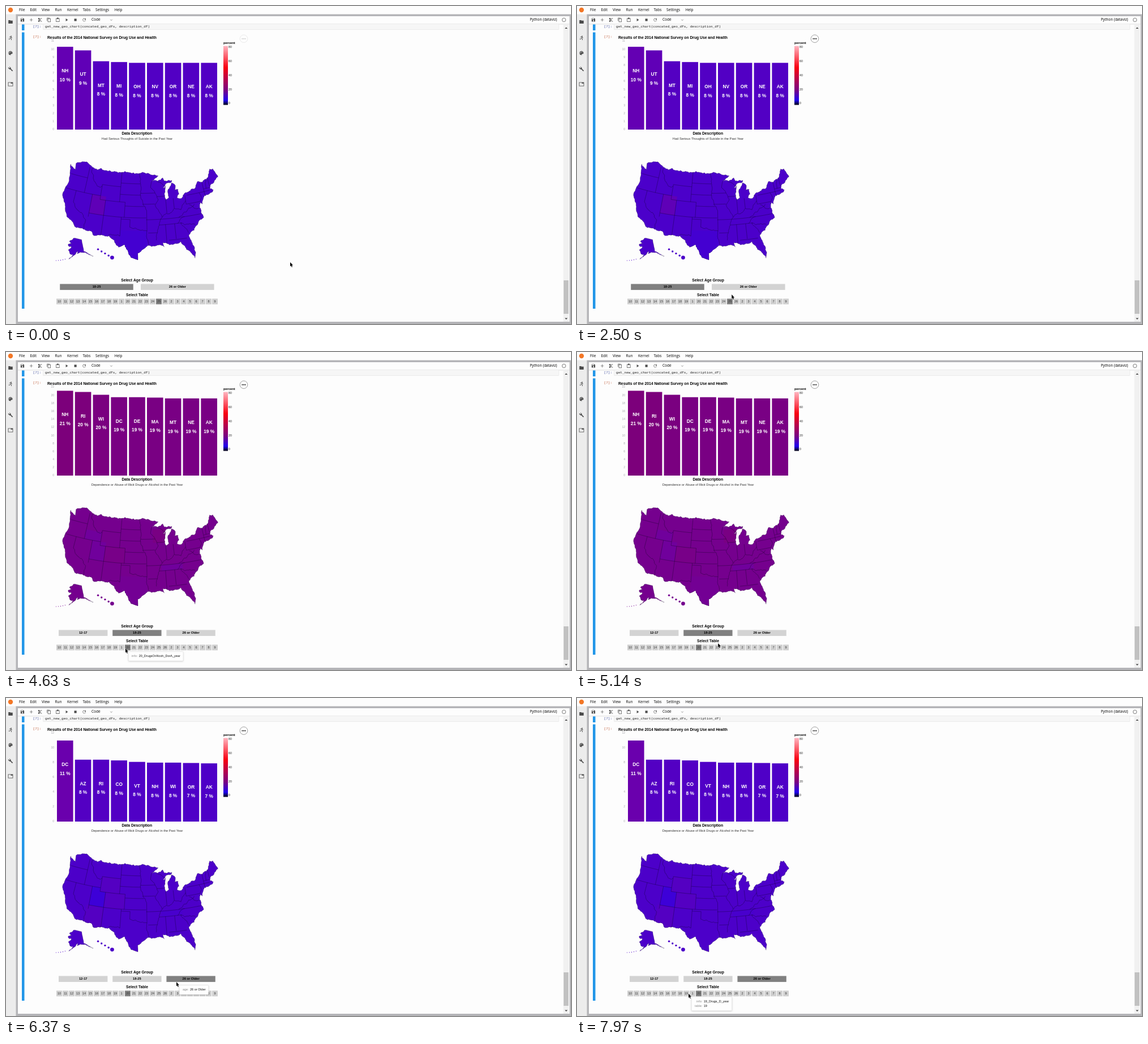
An HTML page with a canvas for the animation above (8 s loop, 998x561 px).

```html
<!DOCTYPE html>
<html lang="en">
<head>
<meta charset="utf-8">
<title>Survey dashboard</title>
<style>
html, body { margin: 0; width: 100%; height: 100%; overflow: hidden; background: #fdfdfd; }
canvas { display: block; }
</style>
</head>
<body>
<canvas id="stage" width="998" height="561"></canvas>
<script>
const ctx = document.getElementById('stage').getContext('2d');
const LOOP = 8000;
const SANS = '"Liberation Sans", Arial, sans-serif';
const UI = '"Open Sans", sans-serif';
const MONO = '"Liberation Mono", monospace';

// ---------- basic drawing ----------
function rect(x, y, w, h, fill) {
  ctx.fillStyle = fill;
  ctx.fillRect(x, y, w, h);
}
function text(str, x, y, { size = 5.72, font = SANS, bold = false, color = '#000', align = 'left' } = {}) {
  ctx.font = `${bold ? 'bold ' : ''}${size}px ${font}`;
  ctx.fillStyle = color;
  ctx.textAlign = align;
  ctx.textBaseline = 'middle';
  ctx.fillText(str, x, y);
}
function circle(x, y, r, fill, stroke) {
  ctx.beginPath();
  ctx.arc(x, y, r, 0, 7);
  if (fill) { ctx.fillStyle = fill; ctx.fill(); }
  if (stroke) { ctx.strokeStyle = stroke; ctx.lineWidth = 0.7; ctx.stroke(); }
}
// Icons are drawn on a 24-unit grid centred on (x, y).
function icon(d, x, y, size = 8.3, stroke = false) {
  ctx.save();
  ctx.translate(x - size / 2, y - size / 2);
  ctx.scale(size / 24, size / 24);
  ctx.fillStyle = ctx.strokeStyle = '#4a4a4a';
  ctx.lineWidth = 2.4;
  if (stroke) ctx.stroke(new Path2D(d));
  else ctx.fill(new Path2D(d), 'evenodd');
  ctx.restore();
}

// ---------- map: conic equal-area projections, longitudes in degrees west ----------
const RAD = Math.PI / 180;
function conic(p1, p2, lon0, [cLon, cLat], scale, x0, y0) {
  const sin = Math.sin, s1 = sin(p1 * RAD);
  const n = (s1 + sin(p2 * RAD)) / 2;
  const c = 1 - s1 * s1 + 2 * n * s1;
  const raw = ([lon, lat]) => {
    const rho = Math.sqrt(c - 2 * n * sin(lat * RAD)) / n, a = n * (lon0 - lon) * RAD;
    return [rho * sin(a), rho * Math.cos(a)];
  };
  const [cx, cy] = raw([cLon, cLat]);
  return point => {
    const [x, y] = raw(point);
    return [x0 + scale * (x - cx), y0 + scale * (y - cy)];
  };
}
const mainland = conic(29.5, 45.5, 96, [96.6, 38.7], 380, 237.2, 362.5);
const alaskan = conic(55, 65, 154, [156, 58.5], 133, 120.5, 438.9);
const hawaiian = conic(8, 18, 157, [160, 19.9], 380, 159.3, 443.1);

let seed = 11;
const jitter = () => (seed = seed * 16807 % 2147483647) / 2147483647 - 0.5;

// Halves a segment until it is short, pushing each midpoint sideways by a share of its length.
function split(a, b, roughness, visit) {
  const dx = b[0] - a[0], dy = b[1] - a[1], length = Math.hypot(dx, dy);
  if (length < 0.4) return visit(b);
  const push = length < 8 ? jitter() * roughness : 0;
  const middle = [(a[0] + b[0]) / 2 - dy * push, (a[1] + b[1]) / 2 + dx * push];
  split(a, middle, roughness, visit);
  split(middle, b, roughness, visit);
}
function trace(path, numbers, roughness = 0, project = mainland) {
  const points = [];
  for (let i = 0; i < numbers.length; i += 2) points.push([numbers[i], numbers[i + 1]]);
  path.moveTo(...project(points[0]));
  for (let i = 1; i < points.length; i++)
    split(points[i - 1], points[i], roughness, p => path.lineTo(...project(p)));
  return path;
}
const parse = str => str.trim().split(/\s+/).map(Number);

const country = trace(new Path2D(), parse(`122.8 49 95.2 49 92 48.3 89.6 48 92.1 46.8 90 46.6 87.9 47.4 87.4 46.5
  84.5 46.5 84.7 46 87 45.7 88 44.6 87 45.2 87.8 43 87.4 41.6 86.3 42 86.4 44 84.8 45.8 83.4 45 83.8 43.7 82.6 43.9
  82.5 42.6 83.4 41.7 81.7 41.5 78.9 42.8 76.2 43.5 74.9 45 71.5 45 69.2 47.4 68 47.2 67 44.8 70.5 43.3 71 42.3
  70 41.8 73.7 40.9 74.1 40.5 75 38.9 75.6 39.4 76 36.9 75.6 35.3 77.9 33.9 81.2 31.6 80.1 26.9 80.5 25.2
  82.6 27.8 84 30.1 85.3 29.7 89.5 30.3 89.2 29.1 93.8 29.7 97.3 27.6 97.2 25.9 99.2 26.4 101.4 29.8 103.1 29
  106.5 31.8 111.1 31.3 114.8 32.5 117.1 32.5 120.6 34.6 122.5 37.7 124.4 40.4 124.1 46.3 124.7 48.4 122.4 47.3`), 0.3);
country.closePath();
const alaska = trace(new Path2D(), parse(`141 69.6 141 60.3 137 59 130 55 136.5 58.2 140 59.7 148 60 152 59.3 150.5 61.2
  154 59 163 54.8 157.8 58.6 162 58.8 166 61.7 161 64 168 65.6 162 66.5 166.5 68.3 156.6 71.3`), 0.25, alaskan);
alaska.closePath();

// Survey lines follow parallels (lat, west, east) or meridians (lon, south, north); the rest follow rivers and ridges.
const borders = new Path2D();
[[46, 123.5, 117], [42, 124.2, 111], [45, 111, 104], [41, 111, 102], [37, 114, 94.6], [46, 104, 96.6], [43, 104, 96.5],
  [40, 102, 95.3], [43.5, 96.5, 91.2], [40.6, 95.8, 91.4], [42.5, 90.6, 87.8], [36.5, 103, 100], [36.5, 94.6, 76],
  [35, 90.3, 83], [33, 94, 91.1], [30.8, 87.6, 82], [39.7, 80.5, 75.5], [42, 79.8, 71.3], [42.7, 73.3, 71]]
  .forEach(([lat, west, east]) => trace(borders, [west, lat, east, lat]));
[[117, 42, 49], [120, 39, 42], [114, 36, 42], [111, 41, 45], [109, 31, 41], [104, 41, 49], [102, 37, 41], [103, 32, 37],
  [100, 34.5, 36.5], [94.4, 33.6, 39], [87.5, 38, 41.7], [84.8, 39, 41.7], [80.5, 39.7, 42], [88.3, 30, 35],
  [85.3, 31, 35], [73.4, 41, 45], [71, 43, 45.3]]
  .forEach(([lon, south, north]) => trace(borders, [lon, south, lon, north]));
`120 39 114.6 35 114.7 32.7 / 116 49 116 47.8 114.4 45.6 113 44.5 111 44.5 / 100 34.5 94.4 33.6 93.8 29.7 / 106.6 32 103 32
  / 97.2 49 96.5 45.5 96.5 42.5 94.5 39 / 92.2 46.7 92.8 45 91.2 43.5 90.2 41.8 91.4 40.4 90.2 38.6 89.2 37 91.1 33 91.5 31
  / 89.2 37 86 38 84.8 39 82.6 38.4 80.6 40.6 / 77.7 39.3 82 37.4 83.7 36.5 / 81.7 36.5 84.3 35
  / 81.1 32 83.2 35 78.6 33.9 / 90.4 46.5 87.6 45.1 / 72.4 42.7 71.5 45 / 75.2 42 74.8 40.5 75.5 39.7 / 79.5 39.5 76.3 38`
  .split('/').forEach(line => trace(borders, parse(line), 0.3));

// Tinted regions: west, east, south, north.
const regions = {
  UT: [114, 109, 37, 42], WY: [111, 104, 41, 45], CO: [109, 102, 37, 41], ID: [117, 111, 42, 44.5],
  AZ: [114.8, 109, 31, 37], TX: [103, 94.4, 25, 33.6], WI: [92, 87, 42.5, 46], TN: [89.5, 82.5, 35, 36.5]
};
for (const name in regions) {
  const [w, e, s, n] = regions[name];
  regions[name] = trace(new Path2D(), [w, n, e, n, e, s, w, s, w, n]);
}

// ---------- data ----------
function colour(v) {
  const low = Math.min(v, 11) - 5, high = Math.max(v - 11, 0);
  return `rgb(${52 + low * 9 + high * 1.8}, 0, ${224 - low * 8.5 - high * 5})`;
}
const abuse = 'Dependence or Abuse of Illicit Drugs or Alcohol in the Past Year';
const scenes = [
  { start: 0, table: '25', age: 0, ages: ['18-25', '26 or Older'], max: 11, step: 1,
    note: 'Had Serious Thoughts of Suicide in the Past Year',
    names: 'NH UT MT MI OH NV OR NE AK', values: [10.3, 9.85, 8.5, 8.4, 8.3, 8.3, 8.3, 8.3, 8.3],
    base: 7.6, tints: { UT: 9.8, TX: 6.8 } },
  { start: 4070, table: '20', age: 1, ages: ['12-17', '18-25', '26 or Older'], max: 22, step: 2, note: abuse,
    names: 'NH RI WI DC DE MA MT NE AK', values: [21.1, 20.8, 20.1, 19.5, 19.5, 19.4, 19.2, 19.2, 19.2],
    base: 17.3, tints: { UT: 14.5, ID: 14.5, TN: 14.5, TX: 16, WI: 19.5, CO: 18.5 } },
  { start: 5900, table: '20', age: 2, ages: ['12-17', '18-25', '26 or Older'], max: 12, step: 2, note: abuse,
    names: 'DC AZ RI CO VT NH WI OR AK', values: [11, 8.4, 8.4, 8.3, 8.1, 8, 8, 7.95, 7.9],
    base: 7.7, tints: { UT: 6, AZ: 8.5, CO: 8.5, WY: 8.5, TN: 7.2 } }
];
const range = (a, b) => Array.from({ length: b - a + 1 }, (_, i) => String(a + i));
const tables = [...range(10, 19), '1', ...range(20, 26), ...range(2, 9)];
const tableInfo = {
  19: [['info:', '19_Drugs_D_year'], ['table:', '19']],
  20: [['info:', '20_DrugsOrAlcoh_DorA_year']],
  23: [['info:', '23_SeriousMental_year'], ['table:', '23']]
};

// ---------- pointer ----------
const moves = [
  { from: 260, to: 400, x: 495, y: 459 },
  { from: 1970, to: 2650, x: 211, y: 523 },
  { from: 4950, to: 5400, x: 301, y: 501 },
  { from: 6640, to: 7200, x: 241, y: 522 },
  { from: 7200, to: 7600, x: 197, y: 521.5 }
];
function pointerAt(t) {
  let x = 502, y = 452;
  for (const move of moves) {
    const k = Math.min(1, Math.max(0, (t - move.from) / (move.to - move.from)));
    x += (move.x - x) * k;
    y += (move.y - y) * k;
  }
  return [x, y];
}
function drawPointer(x, y) {
  ctx.save();
  ctx.translate(x, y);
  const arrow = new Path2D('M0 0V7.4L1.6 6L2.7 8.7L3.9 8.2L2.8 5.6H5z');
  ctx.strokeStyle = '#fff';
  ctx.lineWidth = 1;
  ctx.stroke(arrow);
  ctx.fillStyle = '#000';
  ctx.fill(arrow);
  ctx.restore();
}
function drawTooltip(x, y, rows) {
  const size = 5.5;
  ctx.font = `${size}px ${SANS}`;
  const width = column => Math.max(...rows.map(row => ctx.measureText(row[column]).width));
  const keyRight = x + 5.7 + width(0), valueX = keyRight + 2.4;
  const w = valueX + width(1) + 5.3 - x, h = 8.2 + rows.length * 8.2;
  ctx.save();
  ctx.shadowColor = 'rgba(0,0,0,.18)';
  ctx.shadowBlur = 3;
  ctx.shadowOffsetY = 1;
  ctx.beginPath();
  ctx.roundRect(x, y, w, h, 1.5);
  ctx.fillStyle = '#fefefe';
  ctx.fill();
  ctx.restore();
  ctx.strokeStyle = '#ddd';
  ctx.lineWidth = 0.6;
  ctx.stroke();
  rows.forEach(([key, value], i) => {
    const rowY = y + 8 + i * 8.4;
    text(key, keyRight, rowY, { size, color: '#8a8a8a', align: 'right' });
    text(value, valueX, rowY, { size, color: '#111' });
  });
}

// ---------- notebook window ----------
function drawWindow() {
  rect(0, 0, 998, 561, '#fdfdfd');
  rect(0, 14.5, 18, 547, '#ececec');
  rect(17.5, 14.5, 981, 547, '#b5b5b8');
  rect(21, 18, 974.5, 539, '#fdfdfd');
  circle(8, 7, 4.2, '#f37726');
  [['File', 23], ['Edit', 42.5], ['View', 63], ['Run', 86.5], ['Kernel', 108], ['Tabs', 135.5], ['Settings', 158], ['Help', 191.5]]
    .forEach(([label, x]) => text(label, x, 7.5, { size: 6.5, font: UI }));

  icon('M10 4H2v16h20V6H12z', 8, 28, 9);
  icon('M15 3.5a1.5 1.5 0 1 0 .1 0M6 10l4-3 4 1-2 6 4 3v6M14 8l2 4h4M11 14l-2 4H3', 8, 56, 9, true);
  icon('M12 3a9 9 0 0 0 0 18c2 0 2-2 1-3s0-2 2-2h2c3 0 4-2 4-4 0-5-4-9-9-9zM5 10h3v3H5zM8 6h3v3H8zM13 6h3v3h-3z', 8, 83, 9.5);
  icon('M8 1l6 6v4l9 9-3 3-9-9H7L1 8l1-4 5 5 3-3-4-4z', 8, 111, 9);
  icon('M1 3h22v18H1zM3 5h10v4h8v10H3z', 8, 138, 9.5);

  const tools = [
    'M17 3H3v18h18V7zM12 19a3 3 0 1 1 .1 0zM5 5h10v4H5z',
    'M20 13h-7v7h-2v-7H4v-2h7V4h2v7h7z',
    'M7 9L22 21H18L5 11zM7 15L22 3H18L5 13zM6 2a4 4 0 1 0 .1 0M6 14a4 4 0 1 0 .1 0',
    'M2 1h14v2H4v14H2zM6 5h15v18H6zM8 7v14h11V7z',
    'M3 3h6a3 3 0 0 1 6 0h6v19H3zM5 5v15h14V5h-2v3H7V5z',
    'M8 5v14l11-7z',
    'M6 6h12v12H6z',
    'M17.6 6.4A8 8 0 1 0 19.7 14h-2A6 6 0 1 1 16.2 7.8L13 11h7V4z'
  ];
  tools.forEach((d, i) => icon(d, 29 + i * 15.6, 24.5));
  text('Code', 151, 24.5, { size: 6.5, font: UI });
  icon('M5 9l7 7 7-7', 186, 24.5, 6, true);
  text('Python (dataviz)', 973.5, 24.5, { size: 6.5, font: UI, align: 'right' });
  circle(985.5, 24.5, 3.2, null, '#444');
  rect(21, 31.6, 974.5, 0.7, '#d0d0d0');

  rect(28, 32.5, 4.5, 10.5, '#2196e8');
  rect(28, 46.5, 4.5, 487.5, '#2196e8');
  rect(65.5, 32, 911, 9.7, '#dedede');
  rect(66, 32, 910, 9.2, '#f6f6f6');
  const code = { size: 6.05, font: MONO };
  text('[7]:', 47.5, 36.5, { ...code, color: '#44529f' });
  text('get_new_geo_chart(concated_geo_dfs, description_df)', 69, 36.5, { ...code, color: '#222' });
  text('[7]:', 47.5, 54.8, { ...code, color: '#c05a36' });

  rect(984.5, 33, 9.5, 524, '#f1f1f1');
  rect(985, 484, 8.5, 59, '#c1c1c1');
  ctx.fillStyle = '#444';
  ctx.fill(new Path2D('M987 40l2.5-2.6L992 40zM987 550.5h5l-2.5 2.6z'));
}

// ---------- chart ----------
function drawBars(scene) {
  const scale = 156 / scene.max;
  for (let v = 0; v <= scene.max; v += scene.step)
    text(v, 85.2, 218 - v * scale, { size: 5.2, color: '#a9a9ae', align: 'right' });
  text('Results of the 2014 National Survey on Drug Use and Health', 73, 56.5, { size: 6.76, bold: true });
  scene.names.split(' ').forEach((name, i) => {
    const v = scene.values[i], x = 90 + i * 31.8, top = 218 - v * scale;
    rect(x, top, 28.6, 218 - top, colour(v));
    const label = { size: 8.32, bold: true, color: '#fff', align: 'center' };
    text(name, x + 14.3, top + 42.8, label);
    text(`${Math.floor(v)} %`, x + 14.3, top + 58.4, label);
  });
  text('Data Description', 231.3, 225.3, { size: 6.76, bold: true, align: 'center' });
  text(scene.note, 231.5, 234.5, { color: '#333', align: 'center' });
}
function drawLegend() {
  text('percent', 384, 65.2, { bold: true });
  const ramp = ctx.createLinearGradient(0, 70.5, 0, 174.5);
  [[0, '#ffb6c1'], [0.37, '#f80010'], [0.75, '#780084'], [0.92, '#2000f0'], [1, '#000010']]
    .forEach(stop => ramp.addColorStop(...stop));
  rect(384, 70.5, 8, 104, ramp);
  for (let i = 0; i < 5; i++) text(80 - i * 20, 393, 73 + i * 24.7, { size: 5.2, color: '#222' });
}
function drawMap(scene) {
  const base = colour(scene.base);
  ctx.fillStyle = base;
  ctx.fill(country);
  ctx.fill(alaska);
  ctx.save();
  ctx.clip(country);
  for (const name in scene.tints) {
    ctx.fillStyle = colour(scene.tints[name]);
    ctx.fill(regions[name]);
  }
  ctx.strokeStyle = 'rgba(10,0,30,.7)';
  ctx.lineWidth = 0.5;
  ctx.stroke(borders);
  ctx.restore();
  ctx.strokeStyle = 'rgba(10,0,30,.7)';
  ctx.lineWidth = 0.35;
  ctx.stroke(country);
  ctx.stroke(alaska);
  for (let i = 0; i < 5; i++) {
    circle(...hawaiian([159.5 - i, 22 - i * 0.55]), i < 4 ? 1.7 : 3.4, base);
    circle(88.5 + i * 4, 449 - i * i * 0.15, 0.6, base);
  }
}
function drawControls(scene) {
  const heading = { size: 6.76, bold: true, align: 'center' };
  text('Select Age Group', 231.5, 484.3, heading);
  text('Select Table', 231.5, 509.8, heading);
  const count = scene.ages.length, pitch = 285.6 / count, width = pitch * 0.907;
  scene.ages.forEach((age, i) => {
    const centre = 231.4 + (i - (count - 1) / 2) * pitch;
    rect(centre - width / 2, 490.4, width, 10.5, i === scene.age ? '#808080' : '#d3d3d3');
    text(age, centre, 495.9, { bold: true, align: 'center' });
  });
  tables.forEach((table, i) => {
    const x = 89 + i * 11;
    rect(x, 516.3, 10, 10, table === scene.table ? '#808080' : '#d0d0d0');
    text(table, x + 5, 521.5, { size: 5.5, color: '#333', align: 'center' });
  });
}
function drawMenuButton(active) {
  ctx.globalAlpha = active ? 1 : 0.2;
  circle(420, 57.7, 6.8, '#fff', '#777');
  [-2.6, 0, 2.6].forEach(dx => circle(420 + dx, 57.7, 0.95, '#111'));
  ctx.globalAlpha = 1;
}
function hoveredRows(x, y) {
  if (y > 516 && y < 526.5) return tableInfo[tables[Math.floor((x - 88.5) / 11)]];
  if (y > 490 && y < 502 && x > 283 && x < 370) return [['age:', '26 or Older']];
}

function draw(t) {
  const scene = scenes.findLast(s => t >= s.start);
  const [x, y] = pointerAt(t);
  drawWindow();
  drawBars(scene);
  drawLegend();
  drawMap(scene);
  drawControls(scene);
  drawMenuButton(x < 430);
  // The tooltip trails the pointer slightly.
  const [hoverX, hoverY] = pointerAt(t - 37);
  const rows = hoveredRows(hoverX, hoverY);
  if (rows) drawTooltip(hoverX + 5.2, hoverY + 5.6, rows);
  drawPointer(x, y);
}
function tick() {
  draw(performance.now() % LOOP);
  requestAnimationFrame(tick);
}
tick();
</script>
</body>
</html>
```
